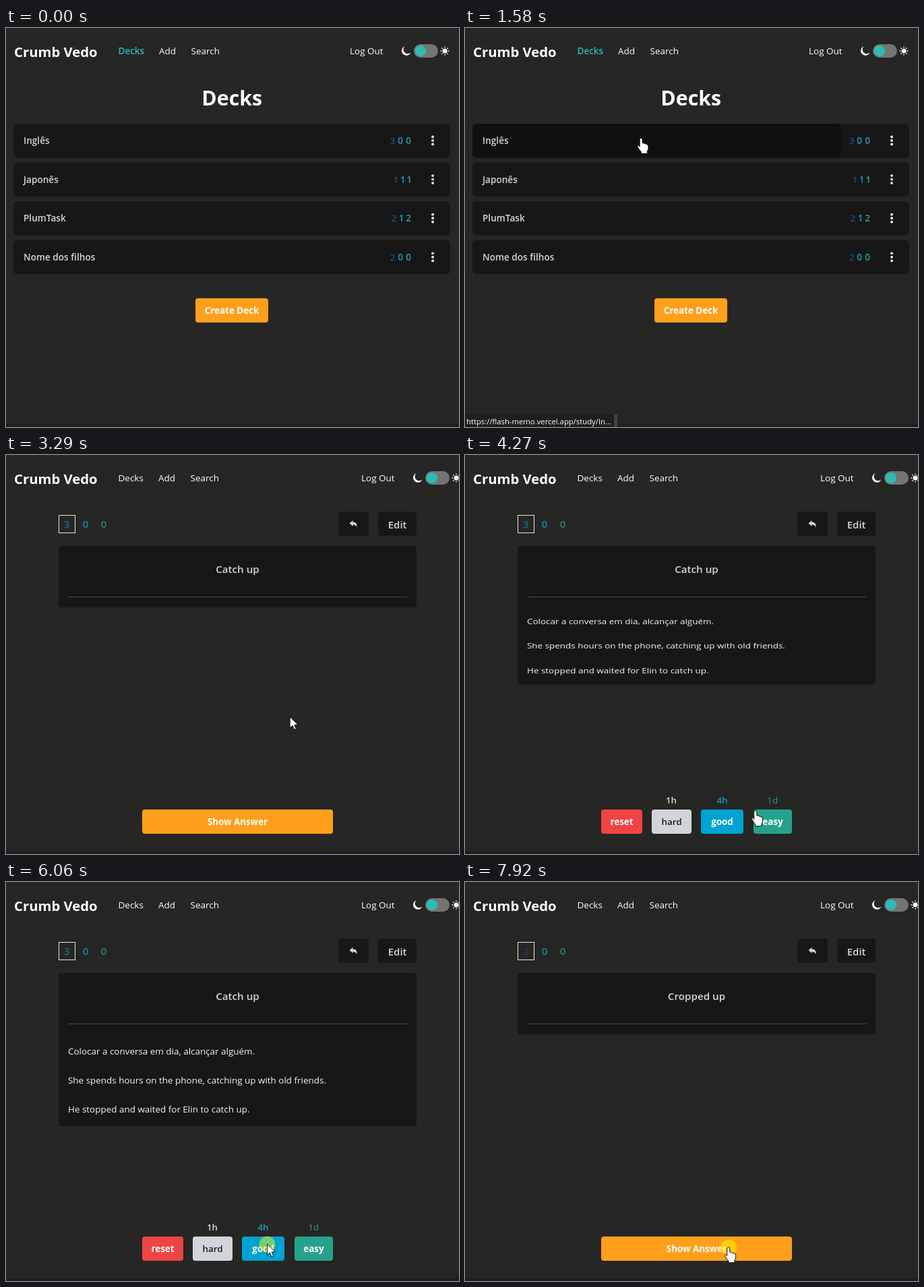
Animation of 672 by 592 pixels, one loop 7990 ms. Source, as an HTML page:

```html
<!DOCTYPE html>
<html lang="en">
<head>
<meta charset="utf-8">
<title>Flashcards</title>
<style>
html, body { margin: 0; width: 100%; height: 100%; overflow: hidden; background: #262624; }
svg { display: block; width: 100%; height: 100%; }
text { font-family: "Open Sans", "Noto Sans", sans-serif; white-space: pre; }
</style>
</head>
<body>
<svg id="stage" viewBox="0 0 672 592"></svg>
<script>
const LOOP = 7990;
const T = { open: 2250, loaded: 3080, answer: 4110, busy: 6040, submit: 6200, next: 7020 };
const PANEL = '#171717', ORANGE = '#ff9f1c', SOFT = '#d1d5db', WHITE = '#fff';

const rect = (x, y, w, h, fill, rx = 0, extra = '') =>
  `<rect x="${x}" y="${y}" width="${w}" height="${h}" rx="${rx}" fill="${fill}" ${extra}/>`;
const text = (s, x, y, size, weight, fill, anchor = 'start', extra = '') =>
  `<text x="${x}" y="${y}" font-size="${size}" font-weight="${weight}" fill="${fill}" text-anchor="${anchor}" ${extra}>${s}</text>`;
const mid = (s, x, y, size, weight, fill, extra) => text(s, x, y, size, weight, fill, 'middle', extra);
const group = (id, body) => `<g id="${id}">${body}</g>`;
const button = (s, x, w, y, fill, color = WHITE, weight = 700) =>
  rect(x, y, w, 36, fill, 4) + mid(s, x + w / 2, y + 23, 13.4, weight, color);

// Deck list
const rowTop = i => 142 + 57.6 * i;
const decks = [
  ['Inglês', '300', [573.5, 585, 597]],
  ['Japonês', '111', [578.5, 588.5, 598]],
  ['PlumTask', '212', [575.5, 586.5, 597]],
  ['Nome dos filhos', '200', [573.5, 585, 597]]
];
const countColors = ['#2160a8', '#1b9ac4', '#2aa3a8'];

function deckRow([name, counts, xs], i) {
  const y = rowTop(i), base = y + 30;
  const dots = [-5.5, 0, 5.5].map(d => `<circle cx="633" cy="${y + 25 + d}" r="1.9" fill="#fff"/>`).join('');
  const nums = xs.map((x, k) => mid(counts[k], x, base, 13.5, k ? 600 : 400, countColors[k])).join('');
  return rect(11, y + 1, 648, 50.4, '#212120', 6) + rect(11, y, 648, 50.2, PANEL, 6) +
    rect(11, y, i === 3 ? 544 : 547, 50.2, '#101010', 6, `id="hover${i}" opacity="0"`) +
    text(name, 26, base, 13.6, 600, SOFT) + nums + dots;
}

// Header
function sun() {
  let rays = '';
  for (let a = 0; a < 360; a += 45)
    rays += `<path d="M651 28.8V27.9" transform="rotate(${a} 651 34)"/>`;
  return `<circle cx="651" cy="34" r="3.5" fill="#fff"/><g stroke="#fff" stroke-width="1.3" stroke-linecap="round">${rays}</g>`;
}
const header =
  text('Crumb Vedo', 12, 43, 20.3, 700, WHITE) +
  text('Decks', 166.5, 39, 13.5, 600, '#2fb8b8', 'start', 'id="navDecks"') +
  group('nav', text('Add', 227, 39, 13.5, 500, WHITE) + text('Search', 274.5, 39, 13.5, 500, WHITE)) +
  group('tools',
    text('Log Out', 510, 39, 13.5, 500, WHITE) +
    '<path d="M591.5 27.2A7 7 0 1 0 600.4 36.6 6.2 6.2 0 0 1 591.5 27.2Z" fill="#fff"/>' +
    rect(605, 24, 36, 20, '#737573', 10) +
    '<circle cx="614.9" cy="34" r="8.1" fill="#2dbcb5"/>' + sun());

const listPage =
  mid('Decks', 335.2, 115, 30.3, 700, WHITE) +
  decks.map(deckRow).join('') +
  button('Create Deck', 281, 108, 401, ORANGE);

// Study page
const CX = 343.5;
const skeleton =
  ['#0b6aa0', '#0ea5c5', '#2a9d97'].map((c, i) => rect(78 + 10 * i, 94, 6, 16, c)).join('') +
  rect(254, 156, 180, 11, '#6b7280');
const counters =
  rect(78.5, 89.5, 24, 26, 'none', 0, 'stroke="#e5e7eb"') +
  mid('3', 90.3, 108.3, 15, 600, '#216a88', 'id="due"') +
  mid('0', 118, 108.3, 15, 600, '#1a86ad') +
  mid('0', 145, 108.3, 15, 600, '#26857f') +
  mid('Catch up', CX, 175, 15.2, 600, SOFT, 'id="front"');
const answer = ['Colocar a conversa em dia, alcançar alguém.',
  'She spends hours on the phone, catching up with old friends.',
  'He stopped and waited for Elin to catch up.'
].map((s, i) => text(s, 92, 256 + 43 * i, 13.45, 500, '#f3f4f6')).join('');
const grades =
  mid('1h', 306, 517, 13.4, 600, '#c3e0e6') +
  mid('4h', 381.5, 517, 13.4, 600, '#12a0c0') +
  mid('1d', 456.3, 517, 13.4, 500, '#2a9d8f') +
  button('reset', 202, 61, 526, '#ef4444') +
  button('hard', 277, 59, 526, SOFT, '#1c1c1c', 600) +
  button('good', 350, 63, 526, '#00a3d3') +
  button('easy', 428, 57, 526, '#26a28c');
const waiting = rect(202, 530, 283, 32, ORANGE, 4) +
  '<path id="spin" d="M-7.2 2.8A7.7 7.7 0 0 1 5.2 -5.7" fill="none" stroke="#fff" stroke-width="2.6"/>';

const studyPage =
  rect(493, 84, 45, 36, PANEL, 4) +
  '<path d="M509.5 101.3L514.6 97V99.6C518.8 99.7 521.2 102 520.2 107.5 519.2 104.6 517.6 103.6 514.6 103.6V105.8Z" fill="#d1d5db"/>' +
  rect(552, 84, 57, 36, PANEL, 4) + mid('Edit', 580.6, 109, 15, 600, SOFT) +
  rect(78, 136, 531, 76, '#212120', 4, 'id="shade"') +
  rect(78, 135, 531, 76, PANEL, 4, 'id="card"') +
  rect(92, 196, 503, 1, '#4a4a4a', 0, 'id="rule"') +
  group('skeleton', skeleton) + group('counters', counters) + group('answer', answer) +
  group('grades', grades) + group('waiting', waiting) +
  group('show', button('Show Answer', 202, 283, 526, ORANGE));

const status = rect(0, 573, 226, 19, '#414141') + rect(0, 573, 221, 19, '#1f1f1f') +
  text('https://flash-memo.vercel.app/study/In...', 2, 588, 11.3, 500, WHITE);

const ink = 'fill="#fff" stroke="#000" stroke-width=".9" stroke-linejoin="round"';
const cursor =
  `<path id="arrow" d="M0 0V16.5L3.9 13 6.4 19 9.2 17.8 6.7 12H11.8Z" ${ink}/>` +
  `<path id="hand" d="M-2.2 2Q-2.2 0 -.2 0T1.8 2V7.2Q4 6.6 5 8.2 7 7.6 8 9.3 10.6 9 10.6 12V15Q10.6 17.2 9 19V22.8H0V20.5Q-3 17 -5.2 13 -6.2 10.4 -4.3 10.4 -3.1 11 -2.2 12.6Z" ${ink}/>`;

document.getElementById('stage').innerHTML =
  rect(0, 0, 672, 592, '#262624') + rect(0, 588, 672, 4, '#221b1f') +
  header + group('list', listPage) + group('study', studyPage) + group('status', status) +
  '<circle id="click" r="12" fill="#ff0" opacity=".47"/>' + group('cursor', cursor);

const el = {};
document.querySelectorAll('[id]').forEach(n => el[n.id] = n);
const set = (n, attrs) => { for (const k in attrs) n.setAttribute(k, attrs[k]); };
const show = (n, on) => n.setAttribute('visibility', on ? 'inherit' : 'hidden');
const between = (t, a, b) => t >= a && t < b;
const clamp = v => Math.max(0, Math.min(1, v));

// Pointer: time, x, y
const path = [
  [130, 648, 590], [550, 515, 408], [780, 432, 330], [900, 411, 262], [1200, 340, 205],
  [1650, 258, 162], [2900, 258, 162], [3290, 421, 388], [3710, 431, 547], [4110, 431, 547],
  [4270, 431, 528], [4550, 432, 487], [4920, 432, 487], [5200, 425, 472], [5790, 387.5, 537],
  [7280, 387.5, 537], [7450, 399, 474], [7650, 391, 542], [7990, 391, 542]
];

// Tangent is zero wherever the pointer rests before or after a key.
function slope(i, k) {
  const a = path[i - 1], b = path[i], c = path[i + 1];
  if (!a || !c) return 0;
  const rests = (p, q) => p[1] === q[1] && p[2] === q[2];
  return rests(a, b) || rests(b, c) ? 0 : (c[k] - a[k]) / (c[0] - a[0]);
}

function pointer(t) {
  let i = 0;
  while (i < path.length - 2 && t >= path[i + 1][0]) i++;
  const a = path[i], b = path[i + 1], d = b[0] - a[0], u = clamp((t - a[0]) / d);
  const u2 = u * u, u3 = u2 * u;
  return [1, 2].map(k =>
    (2 * u3 - 3 * u2 + 1) * a[k] + (u3 - 2 * u2 + u) * d * slope(i, k) +
    (3 * u2 - 2 * u3) * b[k] + (u3 - u2) * d * slope(i + 1, k));
}

function onRow(i, t) {
  const [x, y] = pointer(t);
  return t >= 130 && x > 11 && x < 558 && y >= rowTop(i) && y < rowTop(i) + 50.4;
}

function hoverLevel(i, t) {
  let n = 0;
  for (let k = 0; k < 10; k++) n += onRow(i, t - k * 16);
  return n / 10;
}

function overButton(x, y, graded) {
  if (y < 526 || y > 562 || x < 202 || x > 485) return false;
  if (!graded) return true;
  return [[202, 263], [277, 336], [350, 413], [428, 485]].some(([a, b]) => x >= a && x <= b);
}

function draw(t) {
  const study = t >= T.open;
  const loading = between(t, T.open, T.loaded);
  const graded = between(t, T.answer, T.submit);
  const wait = loading || between(t, T.submit, T.next);
  const second = t >= T.next;

  set(el.navDecks, { fill: study ? WHITE : '#2fb8b8', 'font-weight': study ? 500 : 600 });
  set(el.nav, { transform: `translate(${study ? -1 : 0} 0)` });
  set(el.tools, { transform: `translate(${study ? 17 : 0} 0)` });
  show(el.list, !study);
  show(el.study, study);
  if (!study) decks.forEach((_, i) => set(el['hover' + i], { opacity: hoverLevel(i, t) }));

  show(el.skeleton, loading);
  show(el.counters, !loading);
  show(el.answer, graded);
  show(el.grades, graded);
  show(el.waiting, wait);
  show(el.show, !wait && !graded);

  const p = clamp((t - T.answer + 10) / 380);
  const grow = 0.53 + 0.47 * (1 - (1 - p) ** 2);
  const bottom = loading ? 211 : graded ? 211 + 151 * grow : 226;
  set(el.card, { height: bottom - 135 });
  set(el.shade, { height: bottom - 135 });
  set(el.rule, { y: loading ? 196 : 210 });
  set(el.answer, { transform: `translate(0 ${218 * (1 - grow)}) scale(1 ${grow})`, opacity: 0.4 + 0.6 * clamp(p * 2.3) });
  set(el.due, { fill: second ? '#1f3a6d' : '#216a88' });
  el.due.textContent = second ? '2' : '3';
  el.front.textContent = second ? 'Cropped up' : 'Catch up';
  set(el.spin, { transform: `translate(${CX} 545.5) rotate(${(t - 2270) * 0.45})` });

  show(el.status, between(t, 1250, 2650));
  set(el.status, { opacity: Math.min(clamp((t - 1250) / 120), clamp((2650 - t) / 200)) });

  const [x, y] = pointer(t);
  const hand = study
    ? !wait && !between(t, T.busy, T.next) && overButton(x, y, graded)
    : decks.some((_, i) => onRow(i, t));
  show(el.cursor, t >= 130);
  show(el.hand, hand);
  show(el.arrow, !hand);
  set(el.cursor, { transform: `translate(${x} ${y})` });
  show(el.click, [[2180, 2250], [4060, 4130], [5990, 6130], [7920, LOOP]].some(([a, b]) => between(t, a, b)));
  set(el.click, { cx: x, cy: y + 0.5 });
}

const start = performance.now();
function tick(now) {
  draw(Math.max(0, now - start) % LOOP);
  requestAnimationFrame(tick);
}
draw(0);
requestAnimationFrame(tick);
</script>
</body>
</html>
```
